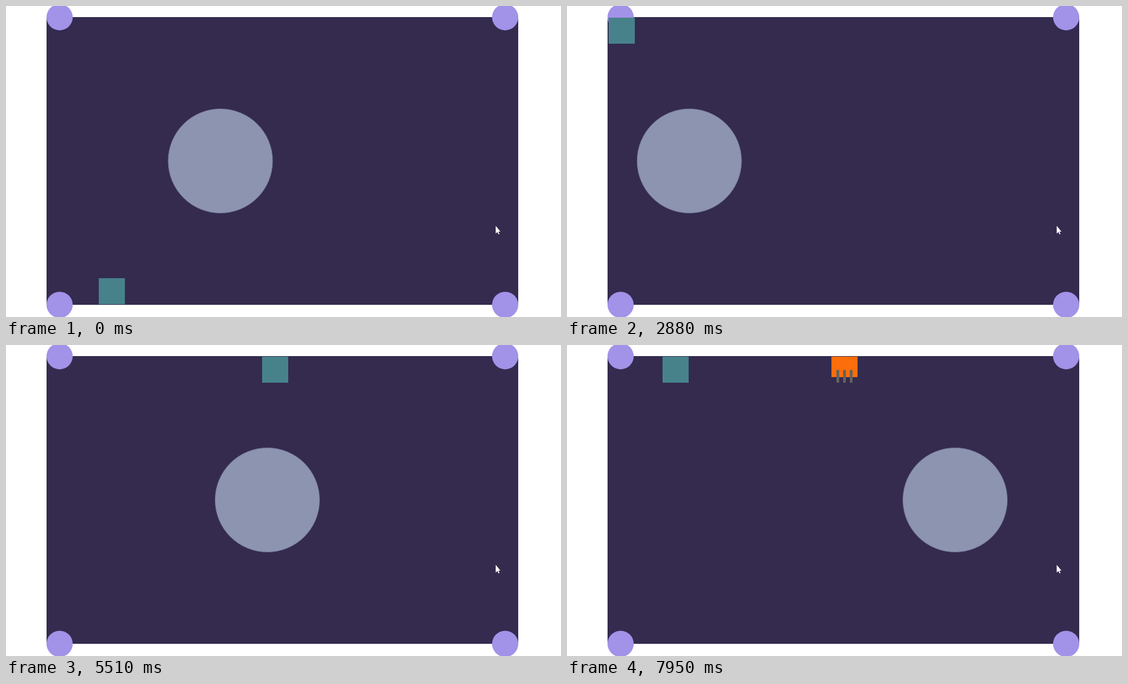
An HTML page with a canvas for the animation above (8 s loop, 999 by 561 pixels).

```html
<!DOCTYPE html>
<html lang="en">
<head>
<meta charset="utf-8">
<title>Gravity box</title>
<style>
  html, body { margin: 0; width: 100%; height: 100%; overflow: hidden; background: #fff; }
  canvas { display: block; }
</style>
</head>
<body>
<canvas id="stage" width="999" height="561"></canvas>
<script>
const ctx = document.getElementById('stage').getContext('2d');
const LOOP = 8000, STEP = 77.8;   // the picture advances in steps of about 78 ms
const PULL = 1.41;                // half the gravity, in px per step squared
const DRAG = 4.5;                 // steps in which a glide loses most of its speed
const FLIP = 18.5;                // step at which gravity turns upwards
const WALL = 73.5, TOP = 21, FLOOR = 491, SPAWN_Y = 256;

// Distance fallen n steps after the start
const drop = n => PULL * Math.max(0, n) ** 2;

// Distance of a dash: constant pull for a while, then a glide slowed by drag
function dash(s, start, pulled) {
  const n = s - start;
  if (n <= pulled) return drop(n);
  const speed = 2 * PULL * pulled;
  return drop(pulled) + speed * DRAG * (1 - Math.exp((pulled - n) / DRAG));
}

function rect(x, y, w, h, color) {
  ctx.fillStyle = color;
  ctx.fillRect(Math.round(x), Math.round(y), w, h);
}

function disc(x, y, r, color) {
  ctx.beginPath();
  ctx.arc(x, y, r, 0, Math.PI * 2);
  ctx.fillStyle = color;
  ctx.fill();
}

function ball(s) {
  const bounce = 30.4, speed = s < bounce ? 7.05 : 7.36;
  disc(171.6 + speed * Math.abs(s - bounce), 279.5, 94, '#8d94b0');
  ctx.strokeStyle = '#6d7095';
  ctx.lineWidth = 1;
  ctx.stroke();
}

function player(s) {
  const slide = Math.max(WALL, 167.4 - drop(s - 10.6));
  const x = slide + dash(s, 36.1, 7.15) + dash(s, 57.5, 10.75) - dash(s, 76.4, 12.35);
  const y = Math.max(TOP, FLOOR - drop(s - FLIP));
  rect(x, y, 47, 47, '#47828b');
}

function walker(x, y) {
  rect(x, y, 47, 37, '#fc6d0b');
  for (const dx of [9, 21, 33]) rect(x + dx, y + 23.5, 5, 23, '#62625f');
}

function fallingWalker(s) {
  const start = 11.7, end = 27;
  if (s < start || s >= end) return;
  // falls first, then is slowed and lifted once gravity has turned
  const before = Math.min(s, FLIP) - start, after = Math.max(0, s - FLIP);
  walker(283, SPAWN_Y + drop(before) + 2 * PULL * before * after - drop(after));
}

function risingWalker(s) {
  const start = 74.7;
  if (s >= start) walker(476, Math.max(TOP, SPAWN_Y - drop(s - start)));
}

function cursor() {
  ctx.fillStyle = '#fff';
  ctx.fill(new Path2D('M881.5 396.5v14l3.1-2.8 2 4.3 1.7-.8-1.9-4.2h3.6z'));
}

function draw(t) {
  const s = Math.floor((t + 18) / STEP);
  rect(0, 0, 999, 561, '#fff');
  rect(73, 20, 849, 519, '#342b4f');
  for (const x of [96.5, 898.5])
    for (const y of [20.3, 539]) disc(x, y, 23.6, '#a292e8');
  ball(s);
  player(s);
  fallingWalker(s);
  risingWalker(s);
  cursor();
}

function frame() {
  draw(performance.now() % LOOP);
  requestAnimationFrame(frame);
}
frame();
</script>
</body>
</html>
```
